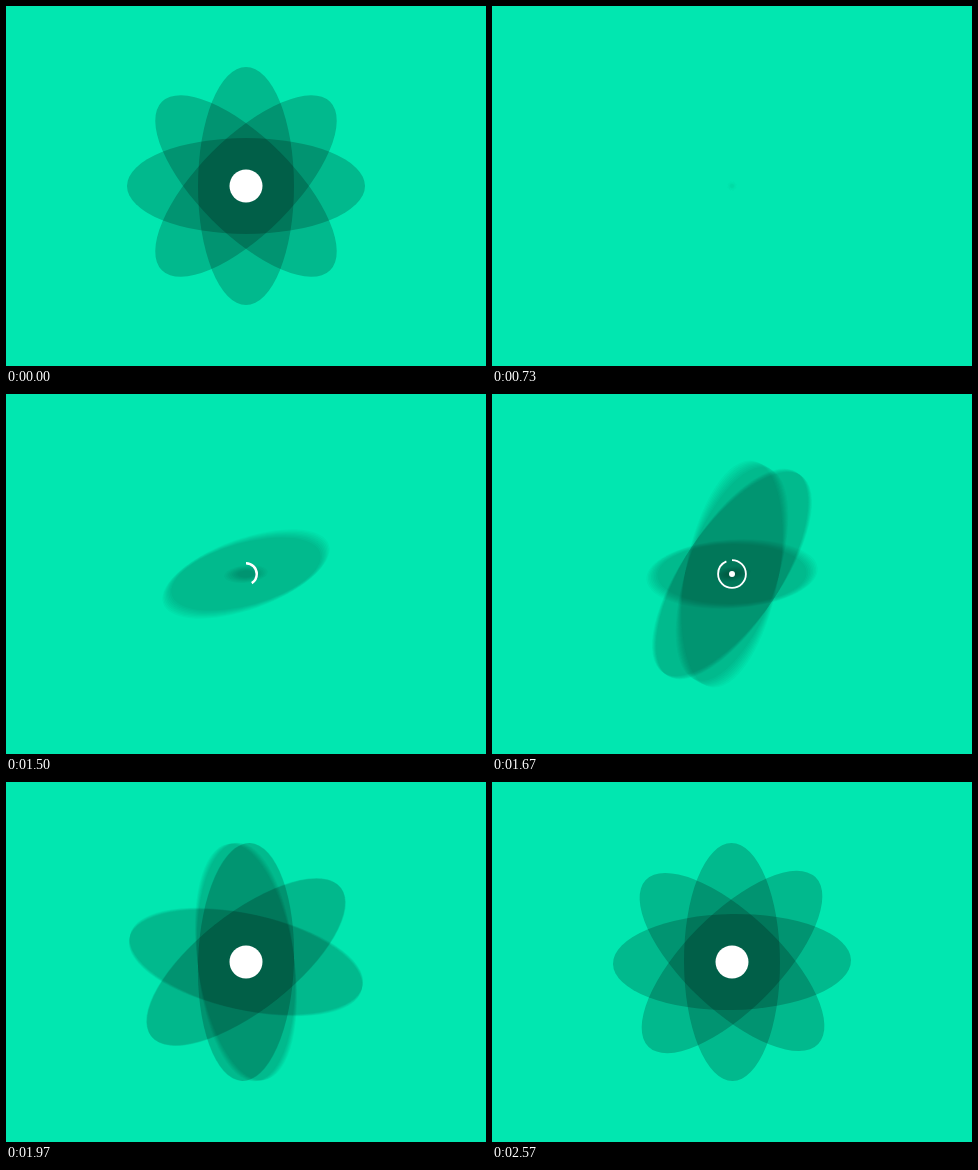
Write an HTML page that moves like this. It is 480 by 360 pixels and loops after 2.86 s.

```html
<!DOCTYPE html>
<html lang="en">
<head>
<meta charset="utf-8">
<title>Atom loop</title>
<style>
  html, body { margin: 0; width: 100%; height: 100%; overflow: hidden; background: #01e7b0; }
  svg { display: block; width: 100%; height: 100%; }
</style>
</head>
<body>
<svg viewBox="0 0 480 360">
  <g transform="translate(240 180)">
    <g id="petals"></g>
    <circle id="ring" fill="none" stroke="#fff" pathLength="100" transform="rotate(-90)"/>
    <circle id="dot" fill="#fff"/>
  </g>
</svg>
<script>
const LOOP = 2860, STEP = LOOP / 86;
const OUT = 430, GONE = 725, RING = 1170, IN = 1378, DOT_IN = 1600, RING_END = 1960;
const STAGGER = 85, SHUTTER = 20, SAMPLES = 8;
const RX = 119, RY = 48, DOT = 16.5, ALPHA = 0.2;

// turn: final angle; spin, grow: place in the staggered entry
const PETALS = [
  { turn: 90, spin: 0, grow: 0 },
  { turn: 180, spin: 1, grow: 1 },
  { turn: 135, spin: 3, grow: 2 },
  { turn: 45, spin: 2, grow: 3 }
];

const clamp = x => Math.min(1, Math.max(0, x));
const leaving = t => clamp((t - OUT) / (GONE - OUT));
const backIn = (x, s = 0.845) => x * x * ((s + 1) * x - s);

// Damped spring from 0 to 1; pace is the time unit in ms
function spring(t, pace) {
  if (t <= 0) return 0;
  const x = t / pace, damp = 0.81, w = Math.sqrt(1 - damp * damp);
  return 1 - Math.exp(-damp * x) * (Math.cos(w * x) + damp / w * Math.sin(w * x));
}

const set = (el, attrs) => { for (const k in attrs) el.setAttribute(k, attrs[k]); };
const byId = id => document.getElementById(id);
const ring = byId("ring"), dot = byId("dot");

for (const petal of PETALS) {
  petal.layers = Array.from({ length: SAMPLES }, () =>
    byId("petals").appendChild(document.createElementNS("http://www.w3.org/2000/svg", "ellipse")));
}

function pose({ turn, spin, grow }, t) {
  if (t < RING) {
    const x = leaving(t);
    return { angle: turn - 120 * backIn(x), scale: 1 - x ** 6 };
  }
  return {
    angle: turn * spring(t - IN - spin * STAGGER, 153),
    scale: spring(t - IN - grow * STAGGER, 57)
  };
}

// Motion blur: faint copies spread over the shutter time
function drawPetal(petal, t) {
  const a = pose(petal, t - SHUTTER / 2), b = pose(petal, t + SHUTTER / 2);
  const travel = RX * (Math.abs(b.angle - a.angle) * Math.PI / 180 + Math.abs(b.scale - a.scale));
  const n = travel < 0.4 ? 1 : Math.min(SAMPLES, 2 + Math.floor(travel));
  const fade = t < RING ? 1 - 0.6 * leaving(t) ** 3 : 1;
  const alpha = 1 - (1 - ALPHA * fade) ** (1 / n);
  petal.layers.forEach((el, i) => {
    const p = pose(petal, t + SHUTTER * ((i + 0.5) / n - 0.5));
    set(el, {
      rx: RX * p.scale, ry: RY * p.scale,
      transform: `rotate(${-p.angle})`,
      "fill-opacity": i < n && p.scale > 0.001 ? alpha : 0
    });
  });
}

function draw(t) {
  PETALS.forEach(petal => drawPetal(petal, t));

  const shrink = clamp((t - OUT) / 216) ** 2;
  set(dot, { r: DOT * (t < RING ? 1 - shrink : spring(t - DOT_IN, 85)) });

  const u = clamp((t - RING) / (RING_END - RING));
  const trim = 100 * clamp((t - RING) / 510) ** 2;
  set(ring, {
    r: 4.6 + 14.9 * u,
    "stroke-width": 3 * (1 - u * u),
    "stroke-dasharray": trim < 100 ? `${trim} 200` : "none",
    visibility: u > 0 && u < 1 ? "visible" : "hidden"
  });
}

const start = performance.now();
function tick() {
  const t = (performance.now() - start) % LOOP;
  draw(Math.floor((t + 4) / STEP) % 86 * STEP);
  requestAnimationFrame(tick);
}
tick();
</script>
</body>
</html>
```
